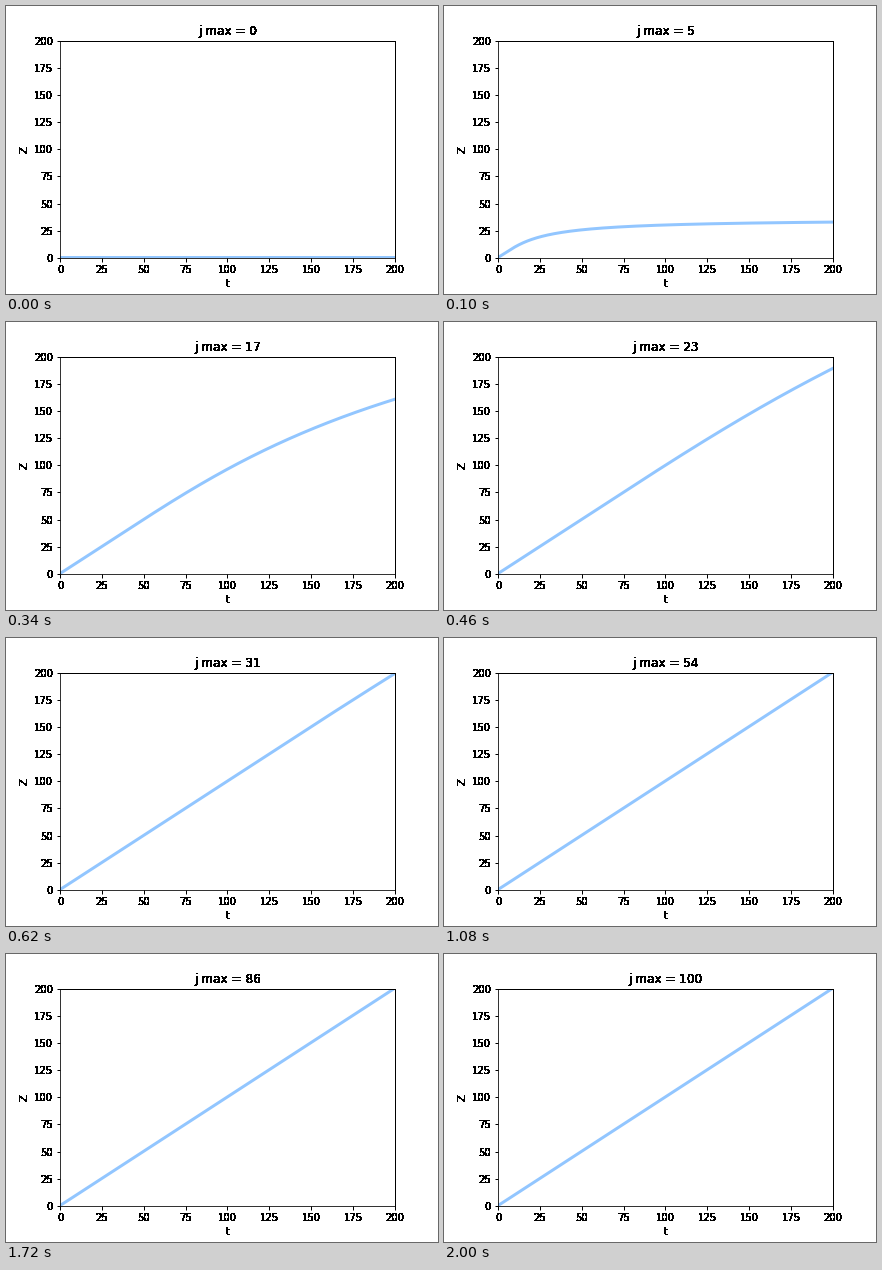
These frames come from a looping animation (432 by 288 pixels, 2.02 s). A matplotlib script:

```python
import numpy as np
import matplotlib.pyplot as plt
from matplotlib.animation import FuncAnimation

FRAMES = 101
INTERVAL = 20

plt.rcParams.update({"font.family": "DejaVu Sans", "font.size": 10})


def harden(img, dpi):
    """Turn antialiased text into solid black pixels."""
    out = np.zeros_like(img)
    out[..., 3] = img[..., 3] > 0.05
    return out, 0, 0


def partition(t, j_max):
    """Rotational partition function summed up to j_max."""
    j = np.arange(j_max + 1)[:, None]
    return ((2 * j + 1) * np.exp(-j * (j + 1) / t)).sum(axis=0)


fig = plt.figure(figsize=(6, 4), dpi=72, facecolor="white")
fig.subplots_adjust(left=0.125, right=0.9, bottom=0.125, top=0.88)
ax = fig.add_subplot()

ticks = np.arange(0, 201, 25)
ax.set(xlim=(0, 200), ylim=(0, 200), xticks=ticks, yticks=ticks)
ax.set_xlabel("t")
ax.set_ylabel("Z")
title = ax.set_title("j max = 0", fontsize=12)
ax.tick_params(width=1)
for side in ("top", "right"):
    ax.spines[side].set_linewidth(1)

labels = ax.get_xticklabels() + ax.get_yticklabels()
for text in [*labels, ax.xaxis.label, ax.yaxis.label, title]:
    text.set_agg_filter(harden)

t = np.linspace(0.01, 200, 400)
line, = ax.plot(t, partition(t, 0), color="#92c6ff", lw=3)


def update(j_max):
    line.set_ydata(partition(t, j_max))
    title.set_text(f"j max = {j_max}")
    return line, title


anim = FuncAnimation(fig, update, frames=FRAMES, interval=INTERVAL,
                     repeat=True, repeat_delay=0, blit=False)
plt.show()
```
